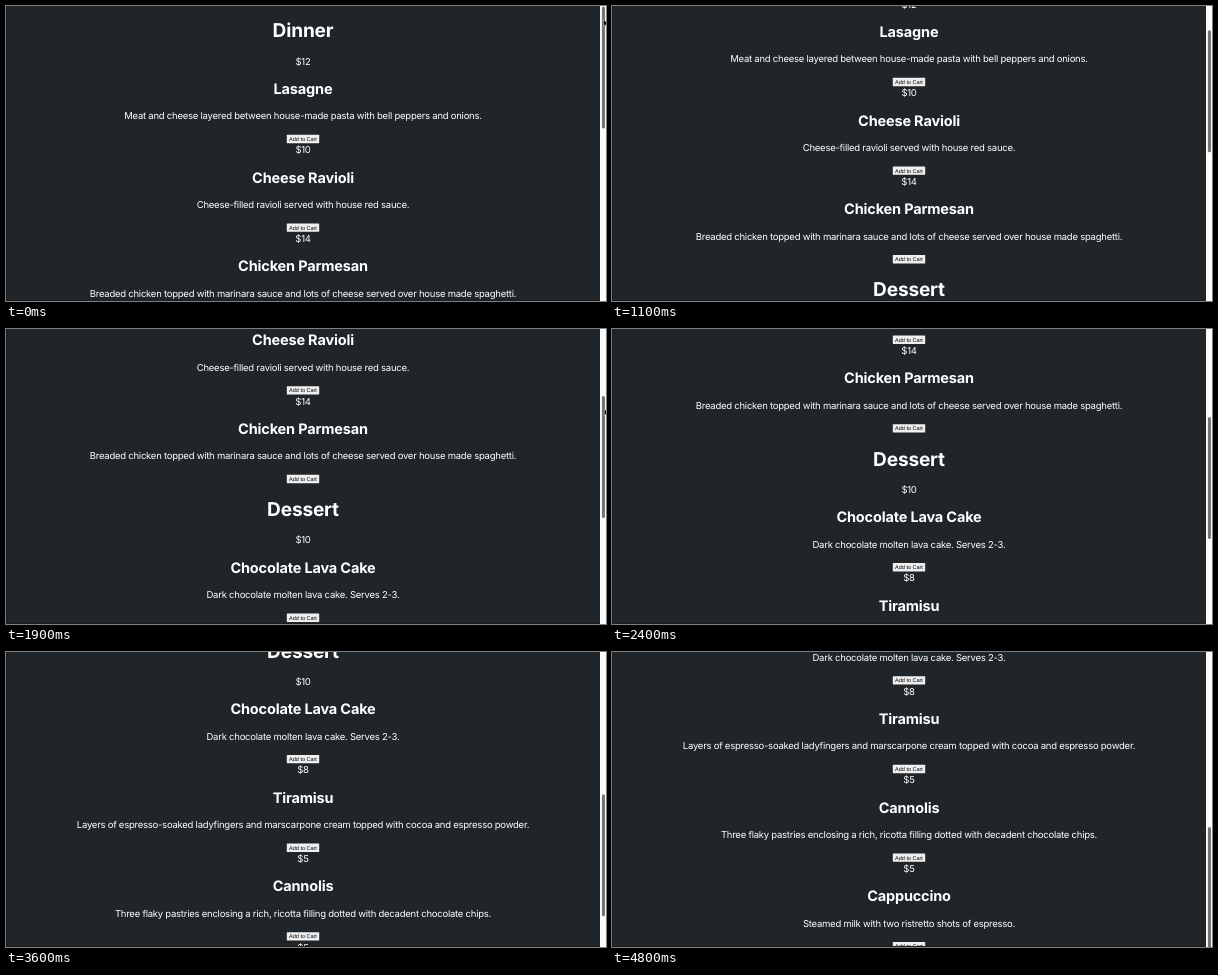
An HTML page that plays this animation: 600x295 px, repeating every 5200 ms.

```html
<!DOCTYPE html>
<html lang="en">
<head>
<meta charset="utf-8">
<title>Menu</title>
<style>
  html, body { margin: 0; width: 100%; height: 100%; overflow: hidden; background: #202529; }
  svg { display: block; }
  text { font-family: Inter, "Open Sans", sans-serif; fill: #fff; text-anchor: middle; text-rendering: geometricPrecision; }
  .title { font-size: 19.1px; font-weight: 700; letter-spacing: -.18px; }
  .dish { font-size: 14.5px; font-weight: 700; letter-spacing: -.17px; }
  .body { font-size: 9.5px; letter-spacing: -.24px; }
  .label { font: 5.5px "Liberation Sans", Arial, sans-serif; fill: #000; }
</style>
</head>
<body>
<svg width="600" height="295" viewBox="0 0 600 295">
  <rect width="600" height="295" fill="#202529"/>
  <g id="page"></g>
  <path d="M.5 0V294.5H594" fill="none" stroke="#191d20"/>
  <rect x="594" width="6" height="295" fill="#fcfcfc"/>
  <rect id="thumb" x="595.9" width="3.1" height="122" rx="1.5" fill="#757575"/>
  <path id="cursor" d="M0 0V6.6L1.6 5.2L2.6 7.4L3.6 7L2.7 4.8H4.8Z" fill="#000" stroke="#fff" stroke-width=".4"/>
</svg>
<script>
const LOOP = 5200, STEP = 100, CENTER = 297, ROW = 88.6;
const $ = id => document.getElementById(id);
const page = $("page"), thumb = $("thumb"), cursor = $("cursor");

const menu = [
  ["Dinner", 0, [
    ["$12", "Lasagne", "Meat and cheese layered between house-made pasta with bell peppers and onions."],
    ["$10", "Cheese Ravioli", "Cheese-filled ravioli served with house red sauce."],
    ["$14", "Chicken Parmesan", "Breaded chicken topped with marinara sauce and lots of cheese served over house made spaghetti."]]],
  ["Dessert", 316, [
    ["$10", "Chocolate Lava Cake", "Dark chocolate molten lava cake. Serves 2-3."],
    ["$8", "Tiramisu", "Layers of espresso-soaked ladyfingers and marscarpone cream topped with cocoa and espresso powder."],
    ["$5", "Cannolis", "Three flaky pastries enclosing a rich, ricotta filling dotted with decadent chocolate chips."],
    ["$5", "Cappuccino", "Steamed milk with two ristretto shots of espresso."]]]
];

const text = (kind, y, s) => `<text class="${kind}" x="${CENTER}" y="${y}">${s}</text>`;

const item = ([price, name, about], y) =>
  text("body", y + 58.7, price) +
  text("dish", y + 88, name) +
  text("body", y + 113.4, about) +
  `<rect x="${CENTER - 16.2}" y="${y + 128.8}" width="32.4" height="8.4" rx=".5" fill="#efefef"/>` +
  text("label", y + 135, "Add to Cart");

page.innerHTML = menu.map(([title, top, items]) =>
  text("title", top + 31.4, title) +
  items.map((it, i) => item(it, top + i * ROW)).join("")).join("");

// [time, value] keys
const scrollKeys = [[100, 0], [1100, 57], [1900, 160.2], [2400, 210.8], [3100, 299], [4100, 378], [4800, 420.6]];
const cursorKeys = [[0, 597.6], [300, 598.6], [1100, 600.5], [1900, 598.4], [2400, 600.5]];

const slope = (a, b) => (b[1] - a[1]) / (b[0] - a[0]);

// Cubic through the keys, or straight lines when smooth is false
function sample(keys, t, smooth) {
  const last = keys.length - 1;
  if (t <= keys[0][0]) return keys[0][1];
  if (t >= keys[last][0]) return keys[last][1];
  const i = keys.findIndex(k => k[0] > t) - 1;
  const a = keys[i], b = keys[i + 1], h = b[0] - a[0], u = (t - a[0]) / h;
  if (!smooth) return a[1] + (b[1] - a[1]) * u;
  const tangent = j => slope(keys[Math.max(j - 1, 0)], keys[Math.min(j + 1, last)]);
  const v = 1 - u;
  return a[1] * v * v * (1 + 2 * u) + b[1] * u * u * (3 - 2 * u)
    + h * u * v * (tangent(i) * v - tangent(i + 1) * u);
}

function draw(now) {
  const t = Math.floor(now % LOOP / STEP) * STEP;
  const scroll = sample(scrollKeys, t, true);
  const top = .5 + scroll * .415;
  page.setAttribute("transform", `translate(0 ${-scroll})`);
  thumb.setAttribute("y", top);
  cursor.setAttribute("transform", `translate(${sample(cursorKeys, t)} ${top + 13})`);
  requestAnimationFrame(draw);
}
draw(performance.now());
</script>
</body>
</html>
```
